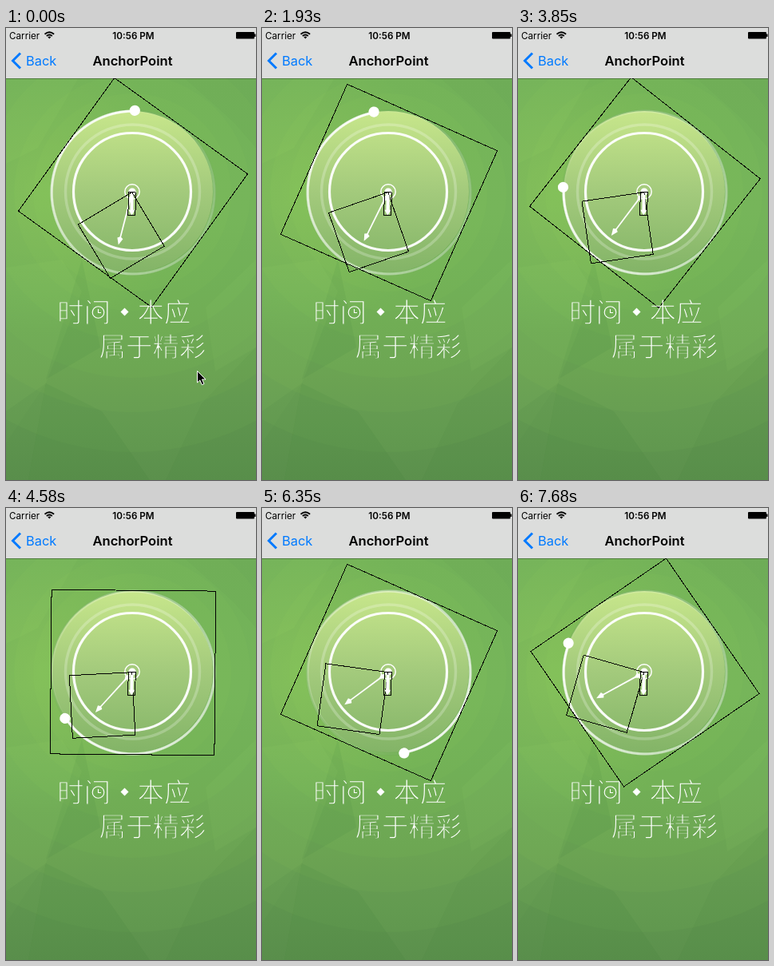
These frames come from a looping animation (313 by 566 pixels, 7780 ms). An HTML page:

```html
<!DOCTYPE html>
<html lang="zh">
<head>
<meta charset="utf-8">
<title>AnchorPoint</title>
<style>
  html, body { margin: 0; width: 100%; height: 100%; overflow: hidden; background: #6ba257; }
  svg, #tail { position: absolute; display: block; }
  svg { left: 0; top: 0; width: 313px; height: 566px; overflow: hidden; }
  #tail {
    left: 53.5px; top: 101px; width: 210px; height: 210px;
    background: conic-gradient(rgba(255,255,255,.05), rgba(255,255,255,.22) 25%,
      rgba(255,255,255,.42) 50%, rgba(255,255,255,.74) 75%, rgba(255,255,255,.97));
    -webkit-mask: radial-gradient(circle closest-side, transparent 99.7px, #000 100.9px, #000 102.9px, transparent 104.1px);
    mask: radial-gradient(circle closest-side, transparent 99.7px, #000 100.9px, #000 102.9px, transparent 104.1px);
  }
  .ui { font-family: Inter, "Liberation Sans", sans-serif; }
  .bold { font-weight: 600; }
  #words { font: 400 33.5px "Noto Sans CJK SC", "Noto Sans CJK", sans-serif; }
  .box { fill: none; stroke: #000; stroke-width: 1; shape-rendering: crispEdges; }
</style>
</head>
<body>
<svg viewBox="0 0 313 566">
  <defs>
    <linearGradient id="field" x2="0" y2="1">
      <stop offset=".1" stop-color="#6aa658"/>
      <stop offset=".4" stop-color="#6ca95a"/>
      <stop offset=".75" stop-color="#669e53"/>
      <stop offset="1" stop-color="#5b904c"/>
    </linearGradient>
    <radialGradient id="light" gradientUnits="userSpaceOnUse" cx="50" cy="205" r="180">
      <stop offset="0" stop-color="#82bd5a" stop-opacity=".6"/>
      <stop offset="1" stop-color="#82bd5a" stop-opacity="0"/>
    </radialGradient>
    <linearGradient id="face" x2="0" y2="1">
      <stop offset="0" stop-color="#c7e68b"/>
      <stop offset=".5" stop-color="#a3ca7c"/>
      <stop offset="1" stop-color="#83b467"/>
    </linearGradient>
  </defs>
  <rect width="313" height="566" fill="url(#field)"/>
  <rect width="313" height="566" fill="url(#light)"/>
  <g id="halos" fill="#a5d86a" fill-opacity=".045"></g>
  <g fill="#2f6b35" fill-opacity=".09">
    <path d="M50 445L28 566H180L120 480Z"/>
    <path d="M0 520L50 445L28 566H0Z" fill-opacity=".04"/>
    <path d="M313 400L245 470L200 566H313Z" fill-opacity=".05"/>
    <path d="M225 64H313V150L285 118Z" fill-opacity=".04"/>
    <path d="M95 290L50 440L118 400Z" fill-opacity=".08"/>
  </g>
  <g fill="#b6df78" fill-opacity=".05">
    <path d="M0 300L70 290L95 330L50 445L0 480Z"/>
    <path d="M313 290L250 350L262 430L313 400Z"/>
    <path d="M0 64H90L40 150L0 170Z"/>
  </g>
  <circle cx="159" cy="206" r="104" fill="#4d8a43" fill-opacity=".16"/>
  <circle cx="158" cy="205" r="101" fill="url(#face)"/>
  <g fill="none" stroke="#fff">
    <circle cx="158.5" cy="205" r="84" stroke-width="3.5" stroke-opacity=".23"/>
    <circle cx="158" cy="205" r="73.5" stroke-width="3.2" stroke-opacity=".95"/>
  </g>
</svg>

<div id="tail"></div>

<svg viewBox="0 0 313 566">
  <defs>
    <!-- Thins the lettering and clears room for the little clock. -->
    <mask id="thin" maskUnits="userSpaceOnUse" x="0" y="320" width="313" height="110">
      <rect y="320" width="313" height="110" fill="#fff"/>
      <use href="#words" fill="none" stroke="#000" stroke-width="1.35"/>
      <rect x="104.5" y="348.5" width="20.5" height="20" fill="#000"/>
    </mask>
  </defs>

  <g id="orbit">
    <rect class="box" x="-102.8" y="-102.8" width="205.6" height="205.6" transform="rotate(34.5)"/>
    <circle cy="-102.7" r="6.6" fill="#fff"/>
  </g>

  <g fill="#fff">
    <circle cx="158" cy="205" r="9.2" fill="none" stroke="#fff" stroke-width="1.5"/>
    <circle cx="158" cy="205" r="4.6"/>
    <g id="second">
      <path d="M-1 6H1L.8 62H-.8Z"/>
      <path d="M0 3L3 9L0 14L-3 9Z"/>
      <path d="M0 68L-3.6 59.5L0 57.5L3.6 59.5Z"/>
      <rect class="box" x="-78.6" width="78.6" height="78.6" transform="rotate(-45.4)"/>
    </g>
    <g id="minute">
      <path d="M-2 3H2V22H4L0 29L-4 22H-2Z"/>
      <rect class="box" x="-4.5" width="9" height="29"/>
    </g>
  </g>

  <g mask="url(#thin)" fill="#fff">
    <g id="words">
      <text x="64" y="368">时间</text>
      <text x="164.5" y="368">本应</text>
      <text x="116.5" y="411">属于精彩</text>
    </g>
  </g>
  <path d="M148.5 350.5L153.5 355.5L148.5 360.5L143.5 355.5Z" fill="#fff"/>
  <g fill="none" stroke="#fff" stroke-width="1.1">
    <circle cx="115.5" cy="356" r="7.3"/>
    <path d="M115.5 352V356.5H119"/>
  </g>

  <path id="cursor" d="M239.5 429.5V444L242.8 441L245.3 446.8L248 445.6L245.5 440H250Z"
    fill="#000" stroke="#fff" stroke-width="1"/>

  <rect width="313" height="63" fill="#dcdddc"/>
  <rect y="63" width="313" height="1" fill-opacity=".3"/>
  <g class="ui">
    <text x="4" y="13.5" font-size="11.7">Carrier</text>
    <text class="bold" x="159.5" y="13.5" font-size="11.7" text-anchor="middle">10:56 PM</text>
    <text x="25" y="47" font-size="16.4" fill="#007aff">Back</text>
    <text class="bold" x="158.5" y="47" font-size="16.6" text-anchor="middle">AnchorPoint</text>
  </g>
  <path d="M18 31.5L8.5 41L18 50.5" fill="none" stroke="#007aff" stroke-width="3"/>
  <g fill="none" stroke="#000" stroke-width="1.8">
    <path d="M48.5 7.7Q54.3 2.7 60.1 7.7"/>
    <path d="M50.8 10Q54.3 7 57.8 10"/>
  </g>
  <path d="M54.3 13.4L52.3 11.3Q54.3 9.8 56.3 11.3Z"/>
  <rect x="288" y="5" width="23" height="8.5" rx="1"/>
  <rect x="311" y="7.5" width="1.5" height="3.5"/>
</svg>

<script>
  const $ = id => document.getElementById(id);

  $('halos').innerHTML = [124, 148, 185, 232, 275, 325]
    .map(r => `<circle cx="158" cy="206" r="${r}"/>`).join('');

  // The picture is held for 150 ms, now and then 140 ms, and 100 ms at the end.
  const LAST = 52;
  const short = new Set([4, 11, 19, 22, 26, 28, 30, 35, 38, 42, 45, 50]);
  const ends = [];
  let loop = 0;
  for (let i = 0; i <= LAST; i++) {
    loop += i === LAST ? 100 : short.has(i) ? 140 : 150;
    ends.push(loop);
  }

  // Orbit angle by step: about one turn per second.
  const keys = [[0, 1.3], [7, 379.1], [13, 709.4], [21, 1138.8], [31, 1676], [43, 2329.4], [52, 2811]];

  function orbitAngle(step) {
    const k = Math.max(1, keys.findIndex(key => key[0] >= step));
    const [a, from] = keys[k - 1], [b, to] = keys[k];
    return from + (to - from) * (step - a) / (b - a);
  }

  function turn(id, x, y, angle) {
    $(id).setAttribute('transform', `translate(${x} ${y}) rotate(${angle})`);
  }

  function draw(step) {
    const angle = orbitAngle(step);
    $('tail').style.transform = `rotate(${angle}deg)`;
    turn('orbit', 159, 206, angle);
    turn('second', 157.8, 205.7, 14.5 + angle / 60);
    turn('minute', 157.7, 205.7, 0.5 + angle / 3600);
    $('cursor').style.display = step === 0 ? '' : 'none';
  }

  const start = performance.now();
  let shown = -1;
  function tick() {
    const t = (performance.now() - start) % loop;
    const step = ends.findIndex(end => t < end);
    if (step !== shown) draw(shown = step);
    requestAnimationFrame(tick);
  }
  tick();
</script>
</body>
</html>
```
